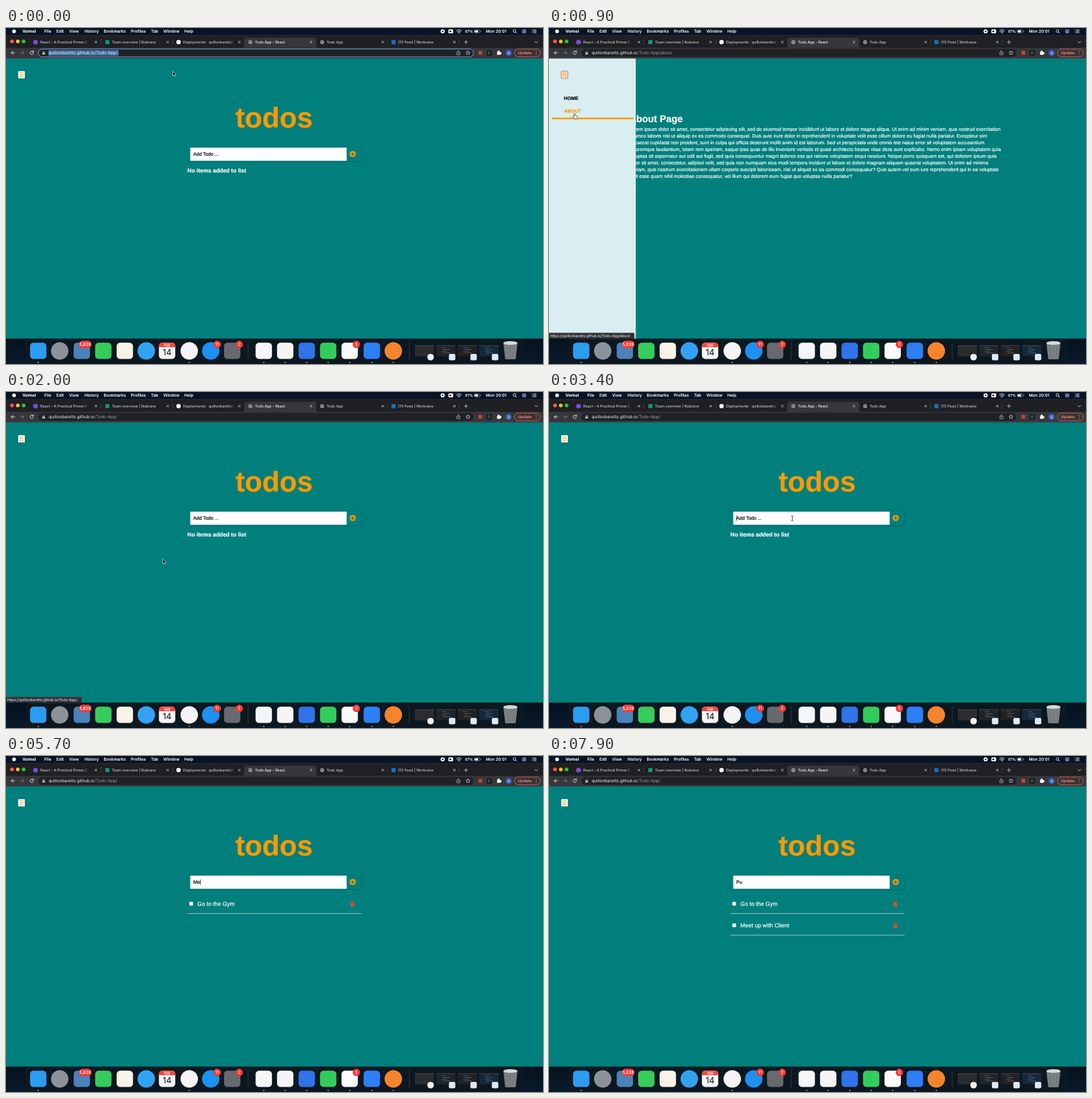
These frames come from a looping animation (800 by 500 pixels, 8000 ms). An HTML page:

```html
<!DOCTYPE html>
<html lang="en">
<head>
<meta charset="utf-8">
<title>Todo App</title>
<style>
  html, body { margin: 0; width: 100%; height: 100%; overflow: hidden; background: #000; }
  svg { display: block; width: 800px; height: 500px; }
  text { white-space: pre; text-rendering: geometricPrecision; stroke-width: .2px;
    font-family: "Liberation Sans", Arial, sans-serif; }
  .ui text { font-family: Inter, Roboto, sans-serif; stroke-width: .1px; }
</style>
</head>
<body>
<svg id="stage" viewBox="0 0 800 500" xmlns="http://www.w3.org/2000/svg"></svg>
<script>
const LOOP = 8000, STEP = 100;
const TEAL = '#007f7d', ORANGE = '#ff9900';
const USER = 'quillonbaretts';
const HOST = USER + '.github.io';

// Drawing helpers
const rect = (x, y, w, h, fill, r = 0, extra = '') =>
  `<rect x="${x}" y="${y}" width="${w}" height="${h}" rx="${r}" fill="${fill}" ${extra}/>`;
const circle = (x, y, r, fill, extra = '') =>
  `<circle cx="${x}" cy="${y}" r="${r}" fill="${fill}" ${extra}/>`;
const line = (d, stroke, w = 1) =>
  `<path d="${d}" fill="none" stroke="${stroke}" stroke-width="${w}" stroke-linecap="round" stroke-linejoin="round"/>`;
const text = (x, y, size, str, fill = '#fff', extra = '') =>
  `<text x="${x}" y="${y}" font-size="${size}" fill="${fill}" stroke="${fill}" ${extra}>${str}</text>`;
const group = (id, body, extra = '') => `<g id="${id}" ${extra}>${body}</g>`;
const BOLD = 'font-weight="700" ', MEDIUM = 'font-weight="500" ', MID = 'text-anchor="middle" ';

const defs = `<defs>
  <linearGradient id="fade"><stop offset="0" stop-color="#1f2023" stop-opacity="0"/><stop offset="1" stop-color="#1f2023"/></linearGradient>
  <linearGradient id="wall" x2="0" y2="1"><stop offset="0" stop-color="#06121e"/><stop offset="1" stop-color="#081a2b"/></linearGradient>
  <filter id="soft" x="-5%" y="-40%" width="110%" height="180%"><feGaussianBlur stdDeviation="1.3"/></filter>
  <clipPath id="page"><rect y="45" width="800" height="417.5"/></clipPath>
</defs>`;

function menuBar() {
  const items = [['File', 57], ['Edit', 75], ['View', 94], ['History', 117], ['Bookmarks', 145.5],
    ['Profiles', 186], ['Tab', 216], ['Window', 234.5], ['Help', 265.5]];
  return rect(0, 0, 800, 11, '#081426') + circle(12, 5, 2.8, '#f2f2f2') +
    text(24.5, 7.3, 6.2, 'Vornel', '#fff', BOLD) +
    items.map(([s, x]) => text(x, 7.3, 6.15, s, '#fff', MEDIUM)).join('') +
    circle(650.5, 5, 3.1, '#fff') + circle(650.5, 5, 1.2, '#222') +
    rect(659, 2, 7.2, 6, '#fff', 1.6) + rect(660.5, 3.8, 2.7, 2.4, '#222', .5) +
    line('M671 4.2q3.8-3.2 7.6 0M672.5 5.8q2.3-1.9 4.6 0', '#fff', .9) + circle(674.8, 7.4, .8, '#fff') +
    text(684, 7.1, 5.3, '67%', '#fff', MEDIUM) +
    rect(697.5, 2.8, 8.5, 4.6, 'none', 1.2, 'stroke="#aaa" stroke-width=".6"') +
    rect(698.3, 3.6, 5, 3, '#fff', .5) + rect(706.7, 4.2, .8, 1.8, '#aaa') +
    text(715, 7.3, 6.1, 'Mon 20:01', '#fff', MEDIUM) +
    circle(757.5, 4.5, 2, 'none', 'stroke="#fff" stroke-width=".8"') + line('M759 6.1l1.6 1.6', '#fff', .8) +
    circle(772, 5, 3.3, '#6a6b9a') +
    line('M784 3h.2M785.8 3h4M784 5h.2M785.8 5h4M784 7h.2M785.8 7h4', '#fff', .8);
}

function globe(x) {
  return circle(x, 21, 2.9, '#9aa0a6') + line(`M${x - 2} 20l1.5 1.2 .3 1.6M${x + .5} 18.6l-.4 1.5 2 .6`, '#4a4c50', .8);
}

function tabStrip() {
  const tabs = [
    ['React - A Practical Primer (', 51, circle(44, 21, 3.6, '#7b4bd8')],
    ['Team overview | Nubrane', 158, rect(148, 18, 6, 6, '#15907f')],
    [`Deployments · ${USER}/`, 264, circle(257, 21, 3.3, '#fff')],
    ['Todo App - React', 371, globe(364)],
    ['Todo App', 477.5, globe(471)],
    ['(11) Feed | Workvane', 584, rect(574.2, 18, 6.2, 6.2, '#1b6fb8', .8)]];
  const lights = ['#f9584e', '#f5bd2e', '#2bc53f'];
  return rect(0, 11, 800, 18.5, '#1f2023') +
    rect(0, 10.7, 800, .6, '#34363a') +
    lights.map((c, i) => circle(9 + i * 8.6, 20, 2.8, c)).join('') +
    `<path d="M351 29.5q4 0 4-4v-7.5q0-3.6 3.6-3.6h100q3.6 0 3.6 3.6v7.5q0 4 4 4z" fill="#36373b"/>` +
    tabs.map(([s, x, icon], i) => {
      const active = i === 3, cx = 134 + i * 106.8;
      return icon + text(x, 23, 5.4, s, active ? '#f1f2f4' : '#c3c6ca') +
        (active ? '' : rect(cx - 17, 15, 13, 12, 'url(#fade)') + rect(cx - 4, 15, 10, 12, '#1f2023')) +
        line(`M${cx - 1.5} 19.5l3 3m0-3l-3 3`, '#d5d7da', .75);
    }).join('') +
    [141.3, 248.2, 568.5, 675.2].map(x => rect(x, 16.5, .6, 9, '#505358')).join('') +
    line('M682.6 21h5.2M685.2 18.4v5.2', '#c8cacd', .8) +
    line('M788 20l2.1 2.1 2.1-2.1', '#c8cacd', .9);
}

function toolbar() {
  return rect(0, 29.3, 800, 16, '#36373b') +
    line('M13 37h-5.2M10.2 34.6l-2.4 2.4 2.4 2.4', '#e4e6e8', .9) +
    line('M21.5 37h5.2M24.3 34.6l2.4 2.4-2.4 2.4', '#7c7f84', .9) +
    line('M40.6 35.5a2.5 2.5 0 1 0 .3 2.2M41 34v1.9h-1.9', '#e4e6e8', .9) +
    group('omnibox', rect(48.3, 31.2, 648, 11.8, '#202124', 5.9)) +
    rect(54, 36.4, 4.2, 3.2, '#b5b8bc', .5) + line('M54.9 36.3v-1q1.2-1.6 2.4 0v1', '#b5b8bc', .7) +
    rect(63, 33, 105, 8.4, '#3f6a9c', 0, 'id="selection"') +
    `<text x="63.5" y="39.3" font-size="6.3" fill="#f2f3f5">${HOST}<tspan id="path" fill="#9aa0a6"></tspan></text>` +
    line('M672.6 36.3h-.9v3.5h4.6v-3.5h-.9M674 38v-4M672.8 35l1.2-1.2 1.2 1.2', '#c5c8cc', .7) +
    `<path d="M688.3 33.7l.9 2.1 2.2.2-1.7 1.5.5 2.2-1.9-1.2-1.9 1.2.5-2.2-1.7-1.5 2.2-.2z" fill="none" stroke="#d5d7da" stroke-width=".7"/>` +
    rect(704, 34.2, 5.4, 5.4, '#c2453d') +
    rect(716.3, 33.3, 7.6, 7.6, '#15191b', 1) + text(720, 39.3, 5.6, 'D', '#58b98b', MID) +
    rect(731.6, 35, 5, 5, '#fff', .8) + circle(734, 34.8, 1.2, '#fff') + circle(737, 37.5, 1.2, '#fff') +
    circle(748.8, 37, 4.9, '#3656ad') + text(748.8, 39, 5.4, 'Q', '#fff', MID) +
    rect(757.5, 31.3, 38.5, 11.5, '#3b3332', 5.75, 'stroke="#e8776e" stroke-width=".7"') +
    text(762.6, 39.1, 5.9, 'Update', '#f28b82', MEDIUM) +
    [34.7, 37.1, 39.5].map(y => circle(790, y, .6, '#f28b82')).join('') +
    rect(0, 44.6, 800, .6, '#4c4d50');
}

function todoItem(id, label, y) {
  return group(id,
    rect(273, y - 6, 5.7, 5.7, '#fff', .8, 'stroke="#777" stroke-width=".4"') +
    text(285, y, 8.57, label) +
    rect(513.6, y - 4.5, 4.8, 6, '#f2502f', .5) + rect(512.7, y - 5.9, 6.6, 1.1, '#d8442c') +
    rect(515, y - 6.6, 2, .8, '#d8442c') + line(`M515.2 ${y - 3.3}v3.6M516.8 ${y - 3.3}v3.6`, '#a7402f', .5) +
    rect(270.3, y + 11, 259.4, .8, '#a9d2d1'));
}

function homePage() {
  return group('home',
    text(399.4, 148, 42.4, 'todos', ORANGE, BOLD + MID) +
    rect(270.5, 178, 259, 20.5, '#003f3f', 1, 'opacity=".55" filter="url(#soft)"') +
    rect(270.5, 177.5, 259, 20.5, TEAL, 1) +
    rect(274.5, 178, 233, 19.6, '#fff') +
    text(279, 190.2, 7.1, '', '#000', 'id="entry"') +
    rect(279, 183.8, .7, 7.8, '#000', 0, 'id="caret"') +
    circle(516.5, 187.6, 4.6, ORANGE) + line('M514.2 187.6h4.6M516.5 185.3v4.6', TEAL, 1.2) +
    text(270.3, 215.3, 8.43, 'No items added to list', '#fff', BOLD + 'id="empty"') +
    todoItem('item1', 'Go to the Gym', 223) + todoItem('item2', 'Meet up with Client', 255));
}

function aboutPage() {
  const lines = [
    'Lorem ipsum dolor sit amet, consectetur adipiscing elit, sed do eiusmod tempor incididunt ut labore et dolore magna aliqua. Ut enim ad minim veniam, quis nostrud exercitation',
    'ullamco laboris nisi ut aliquip ex ea commodo consequat. Duis aute irure dolor in reprehenderit in voluptate velit esse cillum dolore eu fugiat nulla pariatur. Excepteur sint',
    'occaecat cupidatat non proident, sunt in culpa qui officia deserunt mollit anim id est laborum. Sed ut perspiciatis unde omnis iste natus error sit voluptatem accusantium',
    'doloremque laudantium, totam rem aperiam, eaque ipsa quae ab illo inventore veritatis et quasi architecto beatae vitae dicta sunt explicabo. Nemo enim ipsam voluptatem quia',
    'voluptas sit aspernatur aut odit aut fugit, sed quia consequuntur magni dolores eos qui ratione voluptatem sequi nesciunt. Neque porro quisquam est, qui dolorem ipsum quia',
    'dolor sit amet, consectetur, adipisci velit, sed quia non numquam eius modi tempora incidunt ut labore et dolore magnam aliquam quaerat voluptatem. Ut enim ad minima',
    'veniam, quis nostrum exercitationem ullam corporis suscipit laboriosam, nisi ut aliquid ex ea commodi consequatur? Quis autem vel eum iure reprehenderit qui in ea voluptate',
    'velit esse quam nihil molestiae consequatur, vel illum qui dolorem eum fugiat quo voluptas nulla pariatur?'];
  return group('about', text(119.8, 140.3, 14.3, 'About Page', '#fff', BOLD) +
    lines.map((s, i) => text(119.8, 152.8 + i * 10, 7.15, s)).join(''));
}

function sideMenu() {
  return group('side', rect(0, 45, 129.3, 417.5, '#d9eef1') +
      text(22.3, 107.2, 7.14, 'HOME', '#000', BOLD + 'id="linkHome"') +
      text(22.3, 126, 7.14, 'ABOUT', '#000', BOLD + 'id="linkAbout"') +
      rect(4.5, 133.4, 121.5, 2.4, ORANGE, 0, 'id="bar"')) +
    rect(18.2, 64.2, 9.8, 10.8, '#fff', .6, 'id="burger" stroke-width=".8"') +
    line('M20.3 66.9h5.6M20.3 69.5h5.6M20.3 72.1h5.6', ORANGE, .9);
}

function dock() {
  const icons = [
    [48, '#2c9cee'], [80, '#8b929a', 1], [113, '#4b82b9'], [145, '#37cb5b'], [177, '#f7f3e6'],
    [209, '#32a2f3', 1], [240, '#f7f7f7'], [273, '#f6f3f6', 1], [305, '#1d90f1', 1], [337, '#66696d'],
    [384, '#f4f6f8'], [416, '#f5f5f5'], [448, '#2f74e8'], [480, '#32cc5c'], [512, '#fafafa'],
    [545, '#2d7ff5'], [577, '#f5842c', 1]];
  const badges = [[118, '5,828', 9.5], [314.5, '11', 5.8], [347.5, '2', 5.5], [522, '5', 5.5]];
  const wins = [['#2b2c2e', '#f1f1f1'], ['#202428', '#dce9f4'], ['#222022', '#dce9f4'], ['#15283c', '#dce9f4']];
  return rect(0, 462.5, 800, 37.5, 'url(#wall)') +
    rect(30, 463.5, 740, 40, '#0d1720', 5, 'stroke="#1b2831" stroke-width=".6"') +
    icons.map(([x, c, round]) => round ? circle(x, 480.5, 13, c) : rect(x - 12.2, 468.2, 24.4, 24.4, c, 5.2)).join('') +
    `<path d="M227.8 475v-1.6q0-5.2 5.2-5.2h14q5.2 0 5.2 5.2v1.6z" fill="#ee4b40"/>` +
    text(240, 473.8, 5, 'FEB', '#fff', MID) + text(240, 487.3, 12.5, '14', '#222', MID) +
    badges.map(([x, s, w]) => rect(x - w, 465.3, w * 2, 11, '#f13a35', 5.5) + text(x, 473.2, 6.3, s, '#fff', MID)).join('') +
    [360.5, 600.5].map(x => rect(x, 467, .7, 27, '#3a4852')).join('') +
    wins.map(([body, mark], i) => {
      const x = 609 + i * 32;
      const code = i ? [0, 1, 2, 3].map(k => rect(x + 8 + k % 2 * 2, 475.5 + k * 2.6, 7 + k * 3 % 5, .7, '#53707e')).join('') : '';
      return rect(x, 472, 28.5, 16.5, body) + rect(x, 472, 28.5, 1.4, '#3a3c3f') + code +
        (i ? rect(x + 18.8, 485, 9.6, 9.6, mark, 2) : circle(x + 23.5, 489.8, 4.9, mark));
    }).join('') +
    `<path d="M741 468.5h21l-2.6 23.2q-.2 1.3-1.6 1.3h-12.6q-1.4 0-1.6-1.3z" fill="#8d9498" opacity=".85"/>` +
    `<ellipse cx="751.5" cy="468.8" rx="10.6" ry="2.8" fill="#d6d9da"/>` +
    line('M746 473l1.5 18M751.5 473v18M757 473l-1.5 18', '#6d7478', .8) +
    [48, 273, 384, 416, 448, 480, 512, 545, 577].map(x => circle(x, 497.6, .9, '#c9d0d4')).join('');
}

const pointers =
  group('arrow', `<path d="M0 0v6.6l1.6-1.4 1.1 2.5 1.2-.5-1.1-2.4h2.1z" fill="#000" stroke="#fff" stroke-width=".6"/>`) +
  group('hand', `<path d="M-.8.6q.8-1.2 1.6 0v2.6l3 .7q.8.3.6 1.2l-.6 2.9h-4l-2.4-3.2q.3-1 1.8.2z" fill="#fff" stroke="#111" stroke-width=".6"/>`) +
  group('ibeam', line('M-1.4-3.6q1.4 0 1.4 1v5.2q0 1-1.4 1M1.4-3.6q-1.4 0-1.4 1M1.4 3.6q-1.4 0-1.4-1', '#222', .7));

document.getElementById('stage').innerHTML = defs +
  `<g clip-path="url(#page)">${rect(0, 45, 800, 418, TEAL)}${homePage()}${aboutPage()}${sideMenu()}</g>` +
  `<g class="ui">${menuBar()}${tabStrip()}${toolbar()}` +
  group('status', rect(-2, 453.8, 129, 11, '#303135', 1.5, 'id="statusBox" stroke="#55575b" stroke-width=".5"') +
    text(2, 460, 5.3, '', '#d0d2d5', 'id="statusText"')) +
  dock() + `</g>` + group('pointer', pointers);

// Timeline
const el = {};
document.querySelectorAll('#stage [id]').forEach(n => el[n.id] = n);
const show = (node, on) => node.setAttribute('display', on ? 'inline' : 'none');
const ink = (node, color) => ['fill', 'stroke'].forEach(a => node.setAttribute(a, color));
const within = (t, a, b) => t >= a && t < b;

function along(track, t) {
  const i = track.findIndex(k => k[0] > t);
  if (i < 0) return track[track.length - 1].slice(1);
  if (i === 0) return track[0].slice(1);
  const a = track[i - 1], b = track[i];
  const u = (t - a[0]) / (b[0] - a[0]), e = u * u * (3 - 2 * u);
  return a.slice(1).map((v, k) => v + (b[k + 1] - v) * e);
}

const pointerTrack = [[0, 248.5, 64.5], [300, 24, 71], [500, 24, 71], [700, 38, 127], [900, 38, 127],
  [1200, 150, 185], [1500, 24, 71], [1700, 24, 71], [1800, 33, 104], [1900, 36, 106],
  [2000, 233.5, 248.8], [2200, 250, 240], [2600, 362.5, 188]];
const sideTrack = [[300, 0], [500, 1], [900, 1], [1000, 0], [1600, 0], [1800, 1], [1900, 1], [2000, 0]];
const entries = [['Go to the Gym', 3900, 5300], ['Meet up with Client', 5600, 7500], ['Put', 7800, LOOP]];

function typedAt(t) {
  const e = entries.find(([, from, to]) => within(t, from, to));
  return e ? e[0].slice(0, Math.floor((t - e[1]) / STEP) + 1) : '';
}

function render(t) {
  const onAbout = within(t, 800, 1900);
  show(el.about, onAbout);
  show(el.home, !onAbout);
  el.path.textContent = onAbout ? '/Todo-App/about' : '/Todo-App/';
  el.path.setAttribute('fill', t < 400 ? '#f2f3f5' : '#9aa0a6');
  show(el.selection, t < 400);
  el.omnibox.firstChild.setAttribute('stroke', t < 400 ? '#6b9fe0' : 'none');

  const [open] = along(sideTrack, t);
  el.side.setAttribute('transform', `translate(${-130 * (1 - open)} 0)`);
  el.burger.setAttribute('stroke', open > .5 ? '#a5655c' : 'none');
  el.burger.setAttribute('fill', open > .5 ? '#f4ead6' : '#fff');
  const hoverAbout = within(t, 700, 1000), hoverHome = within(t, 1800, 2000);
  ink(el.linkAbout, hoverAbout ? ORANGE : '#000');
  ink(el.linkHome, hoverHome ? ORANGE : '#000');
  show(el.bar, hoverAbout || hoverHome);
  el.bar.setAttribute('y', hoverHome ? 114.6 : 133.4);

  const aboutLink = within(t, 700, 1200);
  show(el.status, aboutLink || within(t, 1800, 2300));
  el.statusText.textContent = `https://${HOST}/Todo-App/${aboutLink ? 'about' : ''}`;
  el.statusBox.setAttribute('width', aboutLink ? 129 : 115);

  const typed = typedAt(t);
  el.entry.textContent = typed || 'Add Todo ...';
  show(el.caret, t >= 2800 && t % 600 >= 300);
  el.caret.setAttribute('x', typed && !onAbout ? 279.2 + el.entry.getComputedTextLength() : 278.8);
  show(el.empty, t < entries[0][2]);
  show(el.item1, t >= entries[0][2]);
  show(el.item2, t >= entries[1][2]);

  const [x, y] = along(pointerTrack, t);
  el.pointer.setAttribute('transform', `translate(${x} ${y})`);
  const hand = within(t, 300, 1000) || within(t, 1500, 2000);
  const beam = t >= 2500;
  show(el.pointer, t < 3900);
  show(el.hand, hand);
  show(el.ibeam, beam);
  show(el.arrow, !hand && !beam);
}

const start = performance.now();
function tick() {
  const t = (performance.now() - start) % LOOP;
  render(Math.floor(t / STEP) * STEP);
  requestAnimationFrame(tick);
}
tick();
</script>
</body>
</html>
```
